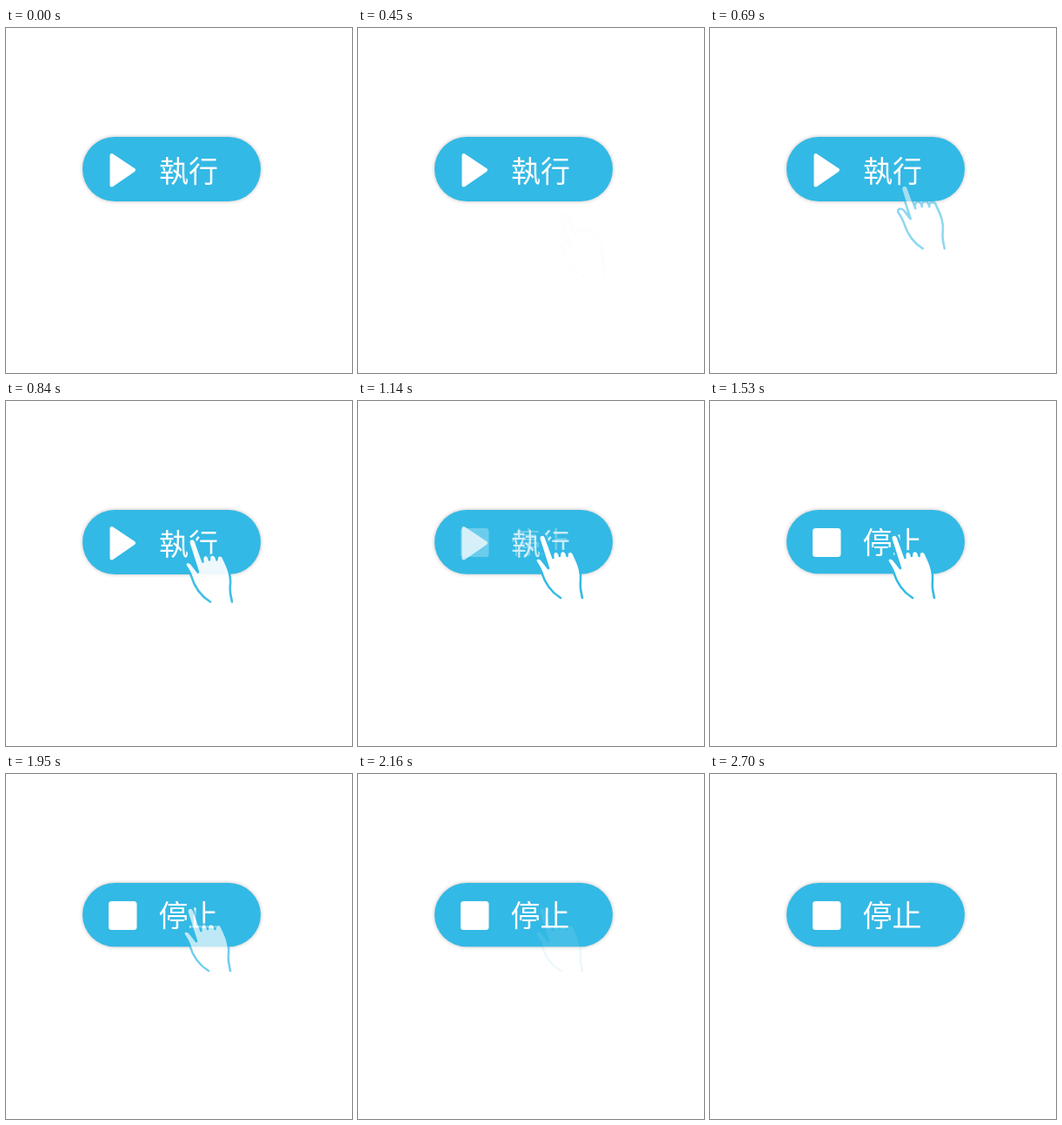
An HTML page for the animation above (5.43 s loop, 398 px wide and 396 px high).

```html
<!DOCTYPE html>
<html lang="zh-Hant">
<head>
<meta charset="utf-8">
<style>
html, body { margin: 0; height: 100%; overflow: hidden; background: #fff; }
svg { display: block; width: 398px; height: 396px; }
#button { fill: #33b9e5; filter: drop-shadow(0 0 2px #0004); }
text { font: 300 34px "Noto Sans CJK TC", "Noto Sans CJK", sans-serif; }
#run, #stop { fill: #fff; }
#hand { fill: #fff; stroke: #33b9e5; stroke-width: 2.6; stroke-linecap: round; stroke-linejoin: round; }
</style>
</head>
<body>
<svg viewBox="0 0 398 396">
  <rect id="button" x="88" y="125" width="205" height="74" rx="37"/>
  <g id="run">
    <path d="M121.5 146V180.5L147 163Z" stroke="#fff" stroke-width="4" stroke-linejoin="round"/>
    <text x="176" y="176.5">執行</text>
  </g>
  <g id="stop">
    <rect x="118" y="146" width="32.5" height="33" rx="3.5"/>
    <text x="175.5" y="175">停止</text>
  </g>
  <path id="hand" d="M233 226C220 218 214 206 211 196C209 190 206 187 204.500 184C203.500 180 208 179.500 211 182C214 185 216 189 219 192
    L208.500 159C207 153 214 151.500 216 156.500L224.500 180C222 171 231 169.500 232 178C231 170 239.500 170 240.500 178
    C240 171 247 171 249 178C254 188 257 196 256 207C255 215 257 220 258 226"/>
</svg>
<script>
const LOOP = 5430;
const [button, run, stop, hand] = ["button", "run", "stop", "hand"].map(id => document.getElementById(id));

// Eased progress from 0 to 1 between two times
function ease(t, from, to) {
  const p = Math.min(1, Math.max(0, (t - from) / (to - from)));
  return p * p * (3 - 2 * p);
}

function draw(now) {
  const t = now % LOOP;
  const enter = ease(t, 425, 925);
  const swap = ease(t, 975, 1455);
  const press = ease(t, 1140, 1335) - ease(t, 1335, 1530);
  const leave = ease(t, 1770, 2250);

  button.setAttribute("height", 74 - 0.8 * swap);
  run.setAttribute("opacity", 1 - swap);
  stop.setAttribute("opacity", swap);

  const away = 1 - enter;
  hand.setAttribute("opacity", enter * (1 - leave));
  hand.setAttribute("transform",
    `translate(${231 + 26 * away} ${190 + 60 * away}) scale(${1 - 0.22 * press}) translate(-231 -190)`);
  requestAnimationFrame(draw);
}
requestAnimationFrame(draw);
</script>
</body>
</html>
```
